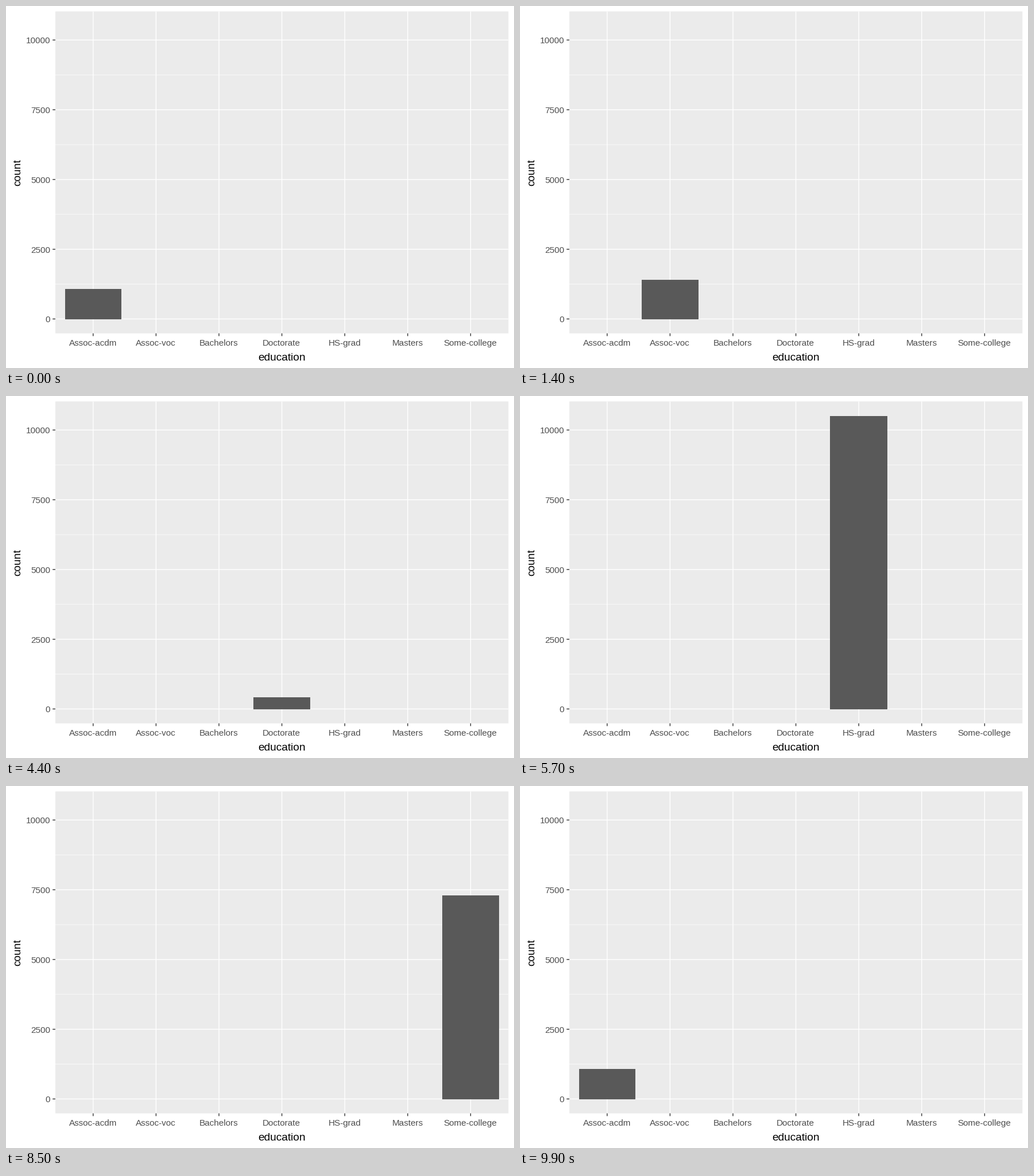
A matplotlib script that plays this animation: 885 by 632 pixels, repeating every 10000 ms.

```python
import numpy as np
import matplotlib.pyplot as plt
from matplotlib.animation import FuncAnimation
from matplotlib.patches import Rectangle

W, H, DPI = 885, 632, 100
STEP, LOOP = 100, 10000          # ms
LEFT, RIGHT, TOP, BOTTOM = 86, 875.3, 9.5, 571.5
ZERO, UNIT = 546.4, 0.0487       # pixel row of count 0, pixels per count
FIRST, GAP = 151.8, 109.6        # first category centre and spacing
MAJOR, TICK = 1.4, 4.8
TEXT, TITLE = 15.3, 19.1
STARTS = [0, 1400, 2900, 4400, 5700, 7100, 8500, 9900]

# label, left, right, top of each bar in pixels
BARS = [
    ("Assoc-acdm", 103, 201, 494),
    ("Assoc-voc", 212, 311, 478),
    ("Bachelors", 321, 420, 286),
    ("Doctorate", 431, 530, 526),
    ("HS-grad", 540, 640, 35),
    ("Masters", 650, 749, 462),
    ("Some-college", 760, 859, 191),
]
BASE = 547

plt.rcParams["font.family"] = "Liberation Sans"
fig = plt.figure(figsize=(W / DPI, H / DPI), dpi=DPI, facecolor="white")
ax = fig.add_axes([0, 0, 1, 1])
ax.set_xlim(0, W)
ax.set_ylim(H, 0)
ax.axis("off")


def pt(px):
    return px * 72 / DPI


def line(x0, y0, x1, y1, color, width, z):
    ax.plot([x0, x1], [y0, y1], color=color, lw=pt(width), zorder=z,
            solid_capstyle="butt", snap=False)


def label(x, y, text, size, color, ha="center", rotation=0):
    ax.text(x, y, text, fontsize=pt(size), color=color, ha=ha, va="baseline",
            rotation=rotation, rotation_mode="anchor")


ax.add_patch(Rectangle((LEFT, TOP), RIGHT - LEFT, BOTTOM - TOP,
                       fc="#ebebeb", lw=0, snap=False, zorder=0))

for count in range(1250, 10000, 2500):
    y = ZERO - count * UNIT
    line(LEFT, y, RIGHT, y, "white", MAJOR / 2, 1)

for count in range(0, 10001, 2500):
    y = ZERO - count * UNIT
    line(LEFT, y, RIGHT, y, "white", MAJOR, 1)
    line(LEFT - TICK, y, LEFT, y, "#333333", MAJOR, 3)
    label(77.3, y + 6, str(count), TEXT, "#4d4d4d", ha="right")

for i, (name, *_) in enumerate(BARS):
    x = FIRST + i * GAP
    line(x, TOP, x, BOTTOM, "white", MAJOR, 1)
    line(x, BOTTOM, x, BOTTOM + TICK, "#333333", MAJOR, 3)
    label(x - 0.4, 593, name, TEXT, "#4d4d4d")

label(480.5, 619, "education", TITLE, "black")
label(25, 290.5, "count", TITLE, "black", rotation=90)

bar = ax.add_patch(Rectangle((0, 0), 0, 0, fc="#595959", lw=0,
                             snap=False, zorder=2))


def update(frame):
    slot = np.searchsorted(STARTS, frame * STEP, side="right") - 1
    _, left, right, top = BARS[slot % len(BARS)]
    bar.set_bounds(left, top, right - left, BASE - top)
    return (bar,)


anim = FuncAnimation(fig, update, frames=LOOP // STEP, interval=STEP,
                     repeat=True, repeat_delay=0)
plt.show()
```
